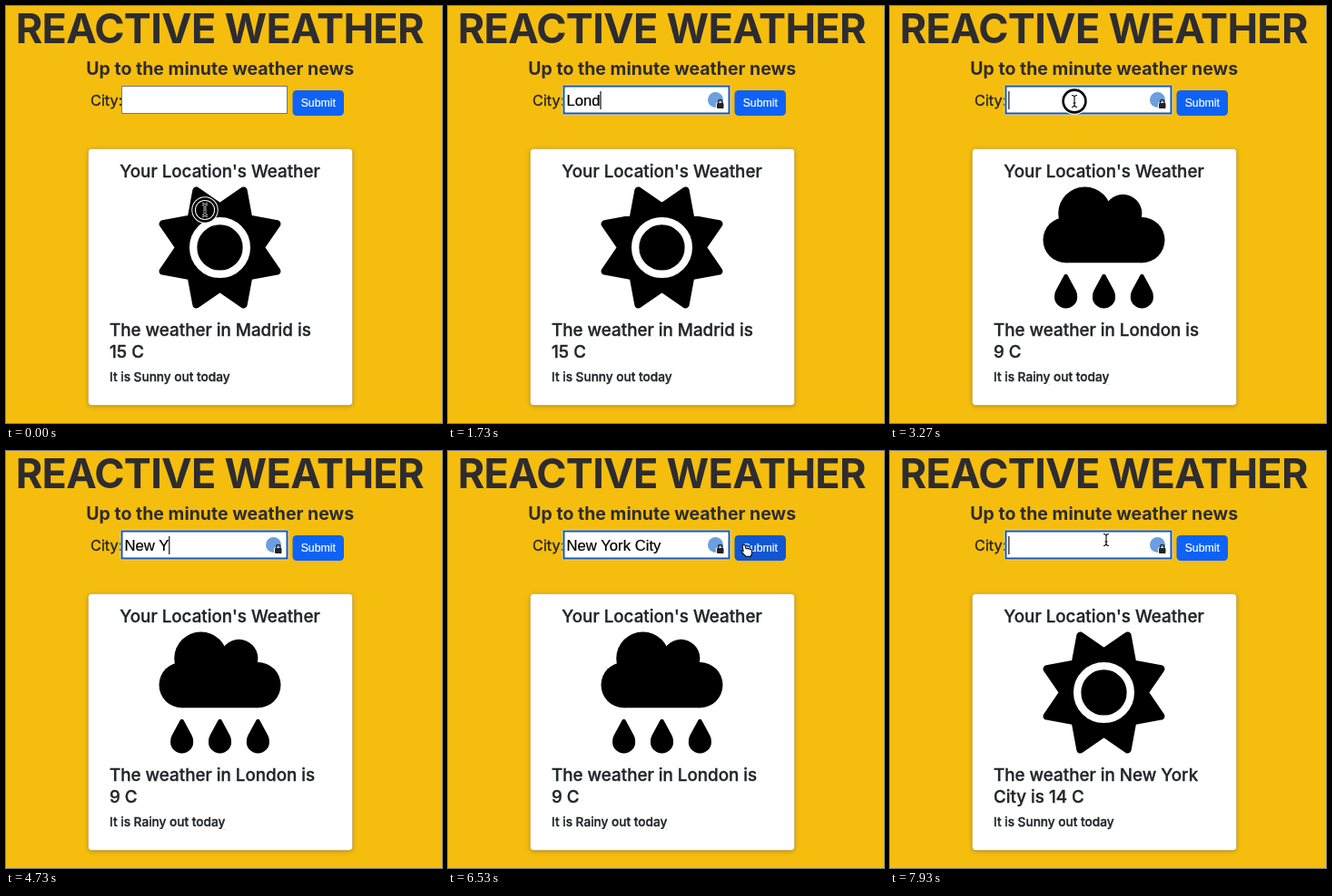
Write an HTML page that moves like this. It is 480x460 px and loops after 8 s.

```html
<!DOCTYPE html>
<html lang="en">
<head>
<meta charset="utf-8">
<title>Reactive Weather</title>
<style>
  html, body { margin: 0; width: 100%; height: 100%; overflow: hidden; background: #f5bd0e; }
  svg { display: block; width: 480px; height: 460px; font-family: Inter, "Open Sans", sans-serif; color: #212529; }
  text { fill: currentColor; stroke: currentColor; stroke-width: .35; }
  .head { font-weight: 700; text-anchor: middle; color: #2d2c2f; stroke: none; }
  .card { font-weight: 500; font-size: 18.8px; }
  .plain { font-family: "Liberation Sans", Arial, sans-serif; stroke-width: .2; }
  #card { fill: #fff; stroke: rgba(90, 70, 20, .2); filter: drop-shadow(0 1.5px 2px rgba(60, 40, 0, .35)); }
</style>
</head>
<body>
<svg viewBox="0 0 480 460">
  <rect width="480" height="460" fill="#f5bd0e"/>
  <text class="head" x="235.3" y="41" font-size="45" letter-spacing="-.7">REACTIVE WEATHER</text>
  <text class="head" x="235.7" y="76" font-size="19.5">Up to the minute weather news</text>

  <text x="93" y="110" font-size="16.3">City:</text>
  <rect id="halo" x="125.7" y="86.7" width="185.6" height="33.6" rx="2" fill="#fff" opacity=".7"/>
  <rect id="field" x="127.5" y="88.5" width="182" height="30" fill="#fff"/>
  <text id="typed" class="plain" x="130.5" y="110" font-size="16.7" color="#000" xml:space="preserve"></text>
  <rect id="caret" y="94" width="1.2" height="20" fill="#111"/>
  <g id="badge">
    <circle cx="294.5" cy="103.5" r="8.5" fill="#6b9fe0"/>
    <rect x="295.5" y="106.5" width="8.5" height="7" rx="1.5" fill="#222" stroke="#fff"/>
    <path d="M297.6 107v-1.6a2.1 2.1 0 0 1 4.2 0v1.6" fill="none" stroke="#222" stroke-width="1.3"/>
  </g>

  <rect id="glow" x="312.5" y="90" width="62.5" height="34" rx="7" fill="#3184fd" opacity=".55"/>
  <rect id="button" x="315.5" y="93" width="56.5" height="28" rx="4.5"/>
  <text class="plain" x="343.8" y="111" font-size="12.3" color="#fff" text-anchor="middle">Submit</text>

  <rect id="card" x="90.5" y="157.5" width="291" height="283" rx="4"/>
  <text class="card" x="235.5" y="189" text-anchor="middle">Your Location's Weather</text>
  <g transform="translate(168.5 199.5) scale(.2617)" fill="#000">
    <g id="sun">
      <polygon id="rays" stroke="#000" stroke-width="32" stroke-linejoin="round"/>
      <circle cx="256" cy="256" r="112" stroke="#fff" stroke-width="32"/>
    </g>
    <g id="rain">
      <circle cx="96" cy="224" r="96"/><circle cx="416" cy="224" r="96"/>
      <circle cx="176" cy="112" r="112"/><circle cx="336" cy="112" r="80"/>
      <rect x="96" y="128" width="320" height="192"/>
      <path id="drop" d="M89 372q7-8 14 0l35 65q6 11 6 27a48 48 0 0 1-96 0q0-16 6-27z"/>
      <use href="#drop" x="160"/><use href="#drop" x="320"/>
    </g>
  </g>
  <text id="line1" class="card" x="114" y="364"></text>
  <text id="line2" class="card" x="114" y="388"></text>
  <text id="summary" x="114" y="413.5" font-size="13.65" font-weight="500"></text>

  <g id="tooltip">
    <rect x="180" y="56" width="230" height="33" rx="6" fill="#000"/>
    <path d="M288 88.5h13l-6.5 6.5z" fill="#000"/>
    <g color="#fff" font-size="10.3" text-anchor="middle">
      <text class="plain" x="294.5" y="69">Press the Vaultmoss icon in your browser’s</text>
      <text class="plain" x="294.5" y="82">toolbar to unlock</text>
    </g>
  </g>

  <g id="pointer" fill="none">
    <g id="ring">
      <circle r="12.4" stroke="#fff" stroke-width="4.6"/>
      <circle r="12.4" stroke="#000" stroke-width="2.6"/>
    </g>
    <g id="beam">
      <path id="stem" d="M-3-6.5q3 0 3 2.5v8q0 2.5-3 2.5M3-6.5q-3 0-3 2.5v8q0 2.5 3 2.5M-1.5 2h3" stroke="#fff" stroke-width="2.6"/>
      <path d="M-3-6.5q3 0 3 2.5v8q0 2.5-3 2.5M3-6.5q-3 0-3 2.5v8q0 2.5 3 2.5M-1.5 2h3" stroke="#000" stroke-width="1.1"/>
    </g>
    <path id="arrow" d="M0 0v13l3-2.7 2 4.7 2.2-1-2-4.5h4z" fill="#000" stroke="#fff"/>
    <path id="hand" d="M-1.5 0q1.4-1.6 2.6.2l1.4 4.3q2-1.2 2.7.3 2-.8 2.6.6 1.9-.4 2.1 1.6l.2 3q0 1.6-1.2 3v1.5H2.4L1 13-3.3 8.7q-.5-2 1.3-1.7l1 .7L-2 1.2z"
          transform="scale(.85)" fill="#fff" stroke="#000" stroke-width="1.2"/>
  </g>
</svg>
<script>
const LOOP = 8000, BLINK = 560, RING = 200;
const $ = id => document.getElementById(id);
const show = (id, on) => $(id).style.display = on ? "" : "none";
const within = (v, a, b) => v >= a && v < b;

const entries = [
  { text: "London", keys: [1070, 1270, 1330, 1730, 1870, 1930], submit: 2600 },
  { text: "New York City", submit: 6600,
    keys: [3530, 3670, 3730, 3870, 4470, 4870, 5000, 5070, 5200, 5400, 5470, 5600, 5800] }
];
const focusTimes = [530, 3130, 7470];
const clicks = [-130, ...focusTimes, ...entries.map(e => e.submit)];
const reports = [
  { from: 0, lines: ["The weather in Madrid is", "15 C"], sky: "Sunny" },
  { from: 2800, lines: ["The weather in London is", "9 C"], sky: "Rainy" },
  { from: 6870, lines: ["The weather in New York", "City is 14 C"], sky: "Sunny" }
];
// time, x, y
const path = [
  [70, 219, 225], [480, 161, 111], [2180, 161, 111], [2500, 328, 117], [2780, 328, 117],
  [2960, 262, 92], [3130, 203, 105], [5800, 208, 104], [6080, 262, 73], [6500, 326, 104],
  [6920, 326, 104], [7200, 272, 78], [7470, 238, 98]
];

function pointerAt(t) {
  const i = path.findIndex(p => p[0] > t);
  if (i < 1) return path.at(i).slice(1);
  const [t0, x0, y0] = path[i - 1], [t1, x1, y1] = path[i];
  const u = (t - t0) / (t1 - t0), k = u * u * (3 - 2 * u);
  return [x0 + (x1 - x0) * k, y0 + (y1 - y0) * k];
}

$("rays").setAttribute("points", Array.from({ length: 16 }, (_, i) => {
  const r = i % 2 ? 259.7 : 171.6, a = i * Math.PI / 8;
  return [256 + r * Math.cos(a), 256 + r * Math.sin(a)];
}).join(" "));

function drawForm(t, overButton) {
  const entry = entries.find(e => within(t, e.keys[0], e.submit));
  $("typed").textContent = entry ? entry.text.slice(0, entry.keys.filter(k => k <= t).length) : "";

  const focusAt = Math.max(...focusTimes.filter(f => f <= t));
  const submitAt = Math.max(...entries.map(e => e.submit).filter(s => s <= t));
  const focused = focusAt > submitAt;
  $("field").setAttribute("stroke", focused ? "#1259b8" : "#767676");
  $("field").setAttribute("stroke-width", focused ? 2 : 1);
  show("halo", focused);
  show("badge", focused);
  show("glow", submitAt > focusAt);
  $("button").setAttribute("fill", overButton ? "#1156d2" : "#0d62f8");

  const lastInput = Math.max(focusAt, ...entries.flatMap(e => e.keys).filter(k => k <= t));
  show("caret", focused && (t - lastInput) % (2 * BLINK) < BLINK);
  const width = entry ? $("typed").getComputedTextLength() : 0;
  $("caret").setAttribute("x", 130.3 + width);

  const fade = Math.min((t - 560) / 130, (1130 - t) / 90, 1);
  $("tooltip").setAttribute("opacity", Math.max(0, fade));
}

function drawReport(t) {
  const { lines, sky } = reports.findLast(r => r.from <= t);
  $("line1").textContent = lines[0];
  $("line2").textContent = lines[1];
  $("summary").textContent = `It is ${sky} out today`;
  show("sun", sky === "Sunny");
  show("rain", sky === "Rainy");
}

function drawPointer(t, x, y, overButton) {
  const overText = within(x, 127, 310) && within(y, 88, 119) ||
    within(x, 89, 383) && (within(y, 60, 80) || y > 157);
  $("pointer").setAttribute("transform", `translate(${x} ${y})`);
  // The pointer hides while typing.
  show("pointer", !within(t, 1070, 2200) && !within(t, 3530, 5820));
  show("ring", clicks.some(c => within(t, c, c + RING)));
  show("hand", overButton);
  show("beam", overText);
  show("arrow", !overButton && !overText);
}

function draw(now) {
  const t = now % LOOP;
  const [x, y] = pointerAt(t);
  const overButton = within(x, 315, 372) && within(y, 93, 121);
  drawForm(t, overButton);
  drawReport(t);
  drawPointer(t, x, y, overButton);
}

const start = performance.now();
function frame() {
  draw(performance.now() - start);
  requestAnimationFrame(frame);
}
frame();
</script>
</body>
</html>
```
